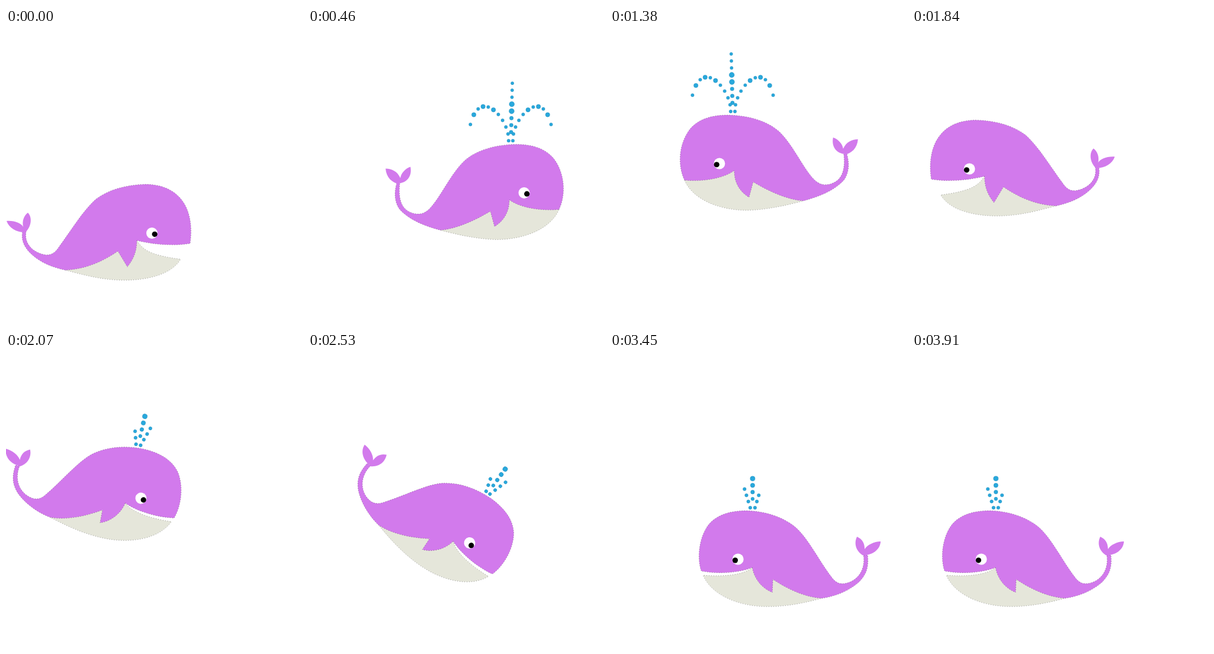
An HTML page that plays this animation: 500 by 500 pixels, repeating every 4140 ms.

```html
<!DOCTYPE html>
<html lang="en">
<head>
<meta charset="utf-8">
<title>Swimming whale</title>
<style>
  html, body { margin: 0; width: 100%; height: 100%; overflow: hidden; background: #fff; }
  svg { display: block; width: 100%; height: 100%; }
  .skin, .fluke { fill: #d27aec; }
  .belly { fill: #e5e6da; }
  .skin, .belly { stroke: #333; stroke-width: .5; stroke-dasharray: 1 3; }
  .drop { fill: #29a8dc; stroke: #1c86b4; stroke-width: .4; }
</style>
</head>
<body>
<svg viewBox="0 0 500 500">
  <!-- every pose faces right, with the eye at the origin -->
  <g id="whale">
    <g id="open" transform="translate(-246.5 -346.5)">
      <path class="belly" d="M100 409L180 371L221 359C230 371 236 383 295 390.500C280 416 240 426 200 426C160 426 128 416 100 409Z"/>
      <path class="skin" d="M221 359C245 365 280 369 311 364C315 338 312 307 294 287C279 270 257 264 235 264C200 265 172 274 152 289C130 308 108 345 90 369C82 381 76 384 66 383C47 380 30 365 34 344H28C24 362 36 376 44 383C58 396 80 405 100 409C138 407 165 393 189 377L205 403.500C215 391 221 378 221 359Z"/>
      <path class="fluke" d="M31 345C18 345 5 338 1 326C14 325 26 330 29 336C27 326 30 317 37 312C44 319 44 334 33 345Z"/>
    </g>
    <g id="half" transform="translate(-400 -340)">
      <path class="belly" d="M258 406L335 371L376 354C390 366 420 370 459 367C445 400 400 420 350 420C315 420 285 413 258 406Z"/>
      <path class="skin" d="M376 354C395 362 430 366 462 360C469 340 467 305 450 282C435 264 412 258 385 258C352 259 324 269 304 285C283 302 262 344 242 370C235 380 228 382 220 381C200 378 184 360 188 333H181C178 360 188 370 195 378C210 392 235 403 258 406C290 404 320 388 341 374L342 396C358 390 372 375 376 354Z"/>
      <path class="fluke" d="M187 333C174 333 160 325 159 310C170 310 182 316 186 323C186 313 190 306 199 302C204 312 202 326 188 334Z"/>
    </g>
    <g id="shut" transform="scale(-1 1) translate(-185 -229)">
      <path class="belly" d="M126 257L210 241L242 252L327 292C300 299 268 307 232 308C185 308 140 290 126 257Z"/>
      <path class="skin" d="M126 257C114 232 116 196 135 171C151 152 175 147 200 147C235 148 266 157 286 175C310 198 325 235 345 256C355 266 365 266 374 263C392 257 398 240 395 213L400 212C405 228 404 244 396 256C380 275 350 286 327 292C298 290 265 274 242 260L235 286C220 277 210 262 210 241C190 255 155 260 126 257Z"/>
      <path class="fluke" d="M396 213C382 211 374 200 377 185C386 188 393 196 394 204C399 193 408 188 419 188C418 203 408 212 396 214Z"/>
    </g>
    <circle r="9.500" fill="#fff"/>
    <circle cx="4.700" cy="1.800" r="4.600"/>
  </g>
</svg>
<script>
  const $ = id => document.getElementById(id);

  const bezier = ([a, b, c, d], t) => [0, 1].map(k =>
    a[k] * (1 - t) ** 3 + 3 * b[k] * t * (1 - t) ** 2 + 3 * c[k] * t * t * (1 - t) + d[k] * t ** 3);

  function drop(pose, cx, cy, r) {
    const c = document.createElementNS('http://www.w3.org/2000/svg', 'circle');
    for (const [k, v] of Object.entries({ class: 'drop', cx, cy, r })) c.setAttribute(k, v);
    $(pose).append(c);
  }

  // Small spout: a column inside a widening V, longer on the right
  for (let i = 0; i < 4; i++) {
    const spread = 4 + 3.2 * i, y = 253 - 10.5 * i;
    drop('half', 375.3, 238 - 11.4 * i, 2.9 + 0.4 * i);
    drop('half', 375.3 + spread, y, 2.8);
    if (i < 3) drop('half', 375.3 - spread, y, 2.8);
  }

  // Big fountain: a column with two arcs falling to the sides
  const arc = [[3.6, 141], [2, 105], [52, 47], [68.1, 113.5]];
  for (let i = 0; i < 8; i++)
    drop('shut', 207 - 0.3 * i, 126.5 - 11.8 * i, i < 3 ? 3.2 : i < 5 ? 4.4 : 2.6);
  for (let i = 0; i <= 10; i++) {
    const [dx, y] = bezier(arc, i / 10);
    for (const side of [-1, 1])
      drop('shut', 207.6 + side * dx, y, i > 3 && i % 2 ? 3.7 : 2.7);
  }

  // Each leg of the swim: number of steps, facing, path of the eye, tilt in degrees
  const legs = [
    { n: 5, face: 1, path: [[246.5, 346.5], [302, 279], [445, 275], [433, 218.5]],
      tilt: (t, pose) => pose === 'half' ? -5 : 0 },
    { n: 4, face: -1, path: [[257, 215], [142, 215], [189, 274], [97, 238]],
      tilt: (t, pose) => pose === 'half' ? -5 + 27 * t : 0 },
    { n: 3, face: 1, path: [[228, 247], [246, 276], [262, 302], [273, 322.5]],
      tilt: t => 13 + 23 * t },
    { n: 2, face: 1, path: [[348, 326.5], [365, 331], [383, 335], [400, 340]],
      tilt: () => 0 },
    { n: 4, face: -1, path: [[277, 363], [209, 323], [166, 387], [117, 350]],
      tilt: (t, pose) => pose === 'shut' ? 10 : 0 }
  ];
  const total = legs.reduce((sum, leg) => sum + leg.n, 0);
  const cycle = ['open', 'half', 'shut', 'half'];
  const HOLD = 230;

  function draw() {
    const step = Math.floor(performance.now() / HOLD) % total;
    const pose = cycle[step % 4];
    let i = step, k = 0;
    while (i >= legs[k].n) i -= legs[k++].n;
    const { n, face, path, tilt } = legs[k];
    const t = i / (n - 1);
    const [x, y] = bezier(path, t);
    $('whale').setAttribute('transform',
      `translate(${x} ${y}) scale(${face} 1) rotate(${tilt(t, pose)})`);
    for (const id of ['open', 'half', 'shut']) $(id).style.display = id === pose ? '' : 'none';
    requestAnimationFrame(draw);
  }
  draw();
</script>
</body>
</html>
```
